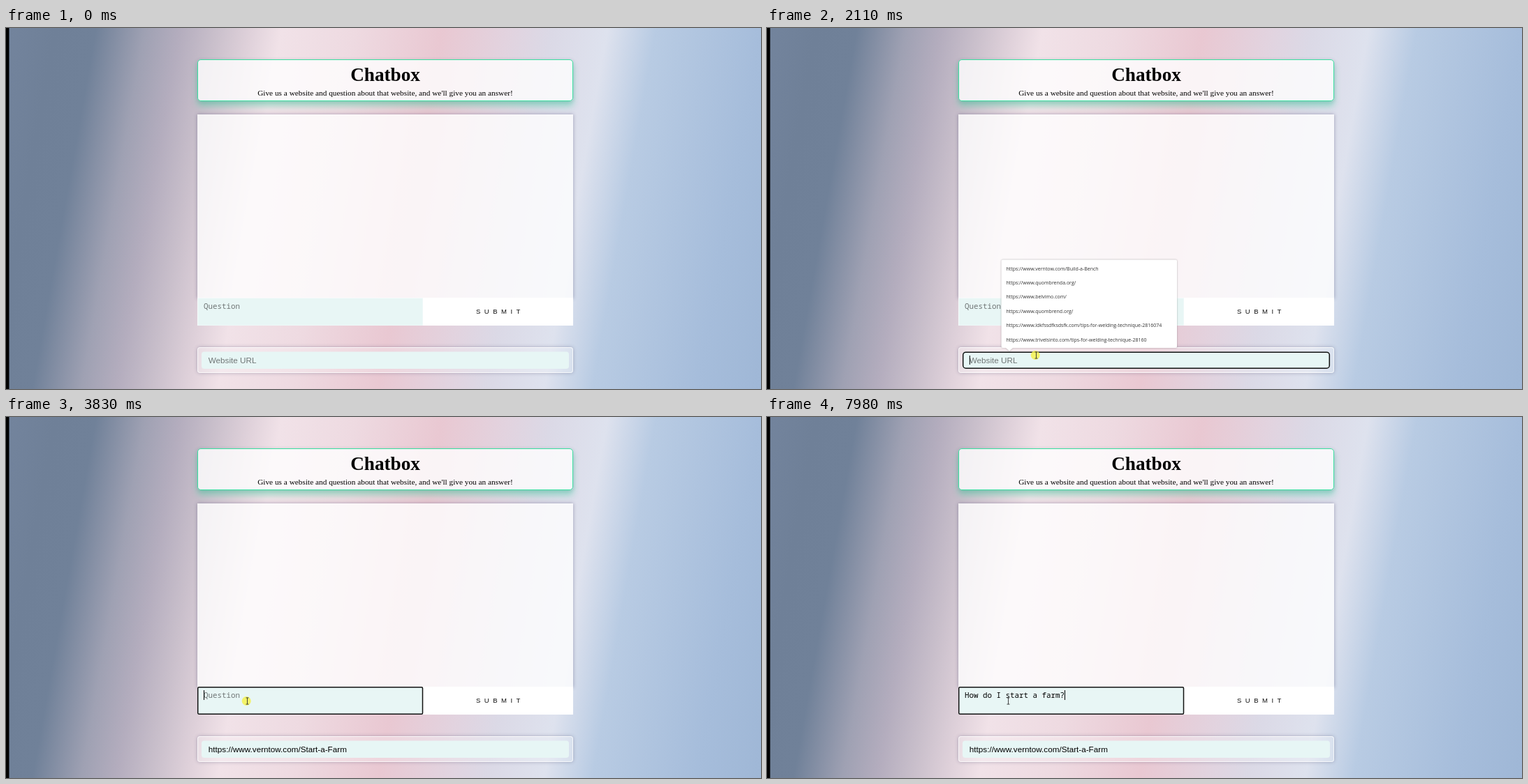
Recreate the animation shown at these times as an HTML page. Size 1081x518 px, loop 8000 ms.

```html
<!DOCTYPE html>
<html lang="en">
<head>
<meta charset="utf-8">
<title>Chatbox</title>
<style>
  html, body { margin: 0; width: 100%; height: 100%; overflow: hidden; }
  #stage {
    position: relative; width: 1081px; height: 518px; overflow: hidden;
    background: linear-gradient(100deg,
      #73849d 0%, #6f8098 6%, #708199 11%, #9fa1b3 17%, #b4adbe 21.3%,
      #c9bfcb 25.6%, #dfd1da 29.9%, #f1e2e8 33.7%, #eedae1 42.7%,
      #e9c8d2 53.3%, #e2d3df 61.4%, #dbd9e6 66.6%, #dee2ee 73.5%,
      #b8cbe3 79.4%, #a6bddb 92%, #9fb7d6 100%);
  }
  #stage > * { position: absolute; box-sizing: border-box; }
  #head {
    left: 274px; top: 45px; width: 538px; height: 60px;
    border: 1.5px solid #3bdfa0; border-radius: 5px;
    background: rgba(255, 255, 255, .8);
    box-shadow: 0 7px 10px rgba(46, 200, 150, .42), 0 1px 5px rgba(60, 60, 100, .18);
  }
  #panel {
    left: 274px; top: 123.5px; width: 538px; height: 264px;
    background: rgba(255, 255, 255, .8);
    box-shadow: 0 0 5px rgba(60, 60, 100, .42);
  }
  #site {
    left: 274px; top: 458px; width: 538px; height: 37px;
    border: 1px solid rgba(255, 255, 255, .75); border-radius: 4px;
    background: rgba(255, 255, 255, .25);
    box-shadow: 0 0 5px rgba(60, 60, 100, .35);
  }
  svg { left: 0; top: 0; }
  .serif { font-family: "Liberation Serif", serif; text-anchor: middle; }
  .sans { font-family: "Liberation Sans", sans-serif; }
  .mono { font: 10.83px "Noto Sans Mono", monospace; }
  .list { font: 7px "Open Sans", sans-serif; fill: #333; }
  #menu { filter: drop-shadow(0 0 1px rgba(0, 0, 0, .3)); }
  .focus { fill: none; stroke: #111; stroke-width: 1.5; }
</style>
</head>
<body>
<div id="stage">
  <div id="head"></div>
  <div id="panel"></div>
  <div id="site"></div>
  <svg width="1081" height="518" viewBox="0 0 1081 518">
    <rect width="4.5" height="518"/>
    <text class="serif" x="543" y="76" font-size="27.2" font-weight="bold">Chatbox</text>
    <text class="serif" x="543" y="97" font-size="11.3">Give us a website and question about that website, and we'll give you an answer!</text>

    <rect x="274" y="387" width="323" height="40" fill="#f6fbfb"/>
    <rect x="275" y="388" width="321.5" height="38.5" fill="#e8f6f5"/>
    <rect x="597" y="387" width="215" height="40" fill="#fff"/>
    <text class="sans" x="673" y="410" font-size="9.5" letter-spacing="5.5" fill="#111">SUBMIT</text>
    <rect x="280" y="464.5" width="526" height="24.5" rx="4" fill="#e7f6f5"/>

    <rect id="askFocus" class="focus" x="274.7" y="387.7" width="321.8" height="38.6" rx="1.5"/>
    <rect id="urlFocus" class="focus" x="280.7" y="465.2" width="524.6" height="23" rx="4"/>
    <text id="ask" class="mono" x="283" y="403"></text>
    <text id="url" class="sans" x="289.8" y="480.8" font-size="11.7"></text>
    <rect id="caret" width="1"/>

    <g id="menu">
      <path d="M338 332.5H585Q587 332.5 587 334.5V457Q587 459 585 459H352L347 463.5 342 459H338Q335.5 459 335.5 457V334.5Q335.5 332.5 338 332.5Z" fill="#fff"/>
    </g>

    <g id="pointer">
      <circle id="press" cx="-1.3" r="6.5" fill="#f5f250" opacity=".85"/>
      <path id="beam" d="M-2-4.6H2M0-4.6V4.6M-2 4.6H2" fill="none" stroke="#333" stroke-width=".9"/>
      <path id="arrow" d="M0 0V11.2L2.6 8.7 4.3 12.6 6 11.9 4.3 8.1H8Z" fill="#fff" stroke="#000" stroke-width=".7"/>
    </g>
  </svg>
</div>
<script>
const LOOP = 8000, STEP = 70, BLINK = 540;
const CLICK_ASK = 1220, CLICK_URL = 2110, PASTE = 2860, CLICK_ASK_AGAIN = 3830;
const ADDRESS = "https://www.verntow.com/Start-a-Farm";
const QUESTION = "How do I start a farm?";
const CHAR = 6.5;

const el = id => document.getElementById(id);
const show = (id, on) => el(id).setAttribute("visibility", on ? "visible" : "hidden");
const set = (id, attrs) => {
  for (const name in attrs) el(id).setAttribute(name, attrs[name]);
};

[
  "verntow.com/Build-a-Bench",
  "quombrenda.org/",
  "belvimo.com/",
  "quombrend.org/",
  "ldkfssdfksdsfk.com/tips-for-welding-technique-2816074",
  "trivelsinto.com/tips-for-welding-technique-28160"
].forEach((site, i) => {
  const row = document.createElementNS("http://www.w3.org/2000/svg", "text");
  row.setAttribute("class", "list");
  row.setAttribute("x", 342.5);
  row.setAttribute("y", 347.5 + i * 20.4);
  row.textContent = "https://www." + site;
  el("menu").append(row);
});

// Bursts of typing: first key, last key, number of keys
const keyTimes = [
  [4970, 4970, 1], [5170, 5300, 2], [5500, 5500, 1], [5700, 5900, 3], [6100, 6170, 2],
  [6370, 6640, 4], [6840, 7230, 4], [7380, 7710, 4], [7980, 7980, 1]
].flatMap(([from, to, n]) =>
  Array.from({ length: n }, (_, i) => from + (to - from) * i / Math.max(1, n - 1)));

// Pointer stops: time, x, y
const stops = [
  [110, 1051, 510], [390, 730, 343], [530, 730, 343], [1010, 470, 426],
  [1220, 436.5, 419], [1640, 436.5, 419], [2110, 385.5, 469.5],
  [2860, 385.5, 469.5], [3000, 383, 469], [3630, 345.5, 407.5]
];

// The pointer moves in even steps within each stretch of motion
function snap(t) {
  const start = [2860, 1690, 590, 110].find(s => s <= t) || 0;
  return start + Math.floor((t - start) / STEP) * STEP;
}

function pointerAt(t) {
  const i = stops.findIndex(s => s[0] > t);
  if (i < 0) return stops[stops.length - 1].slice(1);
  if (i === 0) return stops[0].slice(1);
  const [t0, x0, y0] = stops[i - 1], [t1, x1, y1] = stops[i];
  const k = (t - t0) / (t1 - t0), e = k * k * (3 - 2 * k);
  return [x0 + (x1 - x0) * e, y0 + (y1 - y0) * e];
}

const within = (x, y, l, t, r, b) => x > l && x < r && y > t && y < b;
const during = (t, from, length) => t >= from && t < from + length;

function drawPointer(t) {
  const [x, y] = pointerAt(snap(t));
  const seen = t >= 110;
  const overText = within(x, y, 274, 387, 597, 427) || within(x, y, 280, 464, 806, 489);
  set("pointer", { transform: `translate(${x} ${y})` });
  show("beam", seen && overText);
  show("arrow", seen && !overText);
  show("press", during(t, CLICK_ASK, 140) || during(t, CLICK_URL, 70) ||
    during(t, CLICK_ASK_AGAIN, 80));
}

function drawMenu(t) {
  const p = Math.min(1, Math.max(0, (snap(t) - PASTE) / 190));
  show("menu", t >= CLICK_URL && p < 1);
  set("menu", {
    opacity: 1 - p,
    transform: `translate(461 396) scale(${1 - .054 * p}) translate(-461 -396)`
  });
}

function drawFields(t) {
  const typed = keyTimes.filter(k => k <= t).length;
  const pasted = t >= PASTE;
  const onUrl = t >= CLICK_URL && t < CLICK_ASK_AGAIN;
  const onAsk = t >= CLICK_ASK && !onUrl;

  el("ask").textContent = typed ? QUESTION.slice(0, typed) : "Question";
  set("ask", { fill: typed ? "#000" : "#6f7575" });
  el("url").textContent = pasted ? ADDRESS : "Website URL";
  set("url", { fill: pasted ? "#000" : "#707676" });
  show("askFocus", onAsk);
  show("urlFocus", onUrl);

  const since = typed ? keyTimes[typed - 1]
    : [CLICK_ASK_AGAIN, PASTE, CLICK_URL, CLICK_ASK].find(s => s <= t);
  show("caret", (onAsk || onUrl) && (t - since) % (2 * BLINK) < BLINK);
  const urlEnd = pasted ? el("url").getComputedTextLength() - .6 : 0;
  set("caret", onUrl
    ? { x: 289.8 + urlEnd, y: 470, height: 13 }
    : { x: 283 + typed * CHAR, y: 392, height: 14 });
}

const begin = performance.now();
function frame() {
  const t = (performance.now() - begin) % LOOP;
  drawFields(t);
  drawMenu(t);
  drawPointer(t);
  requestAnimationFrame(frame);
}
frame();
</script>
</body>
</html>
```
